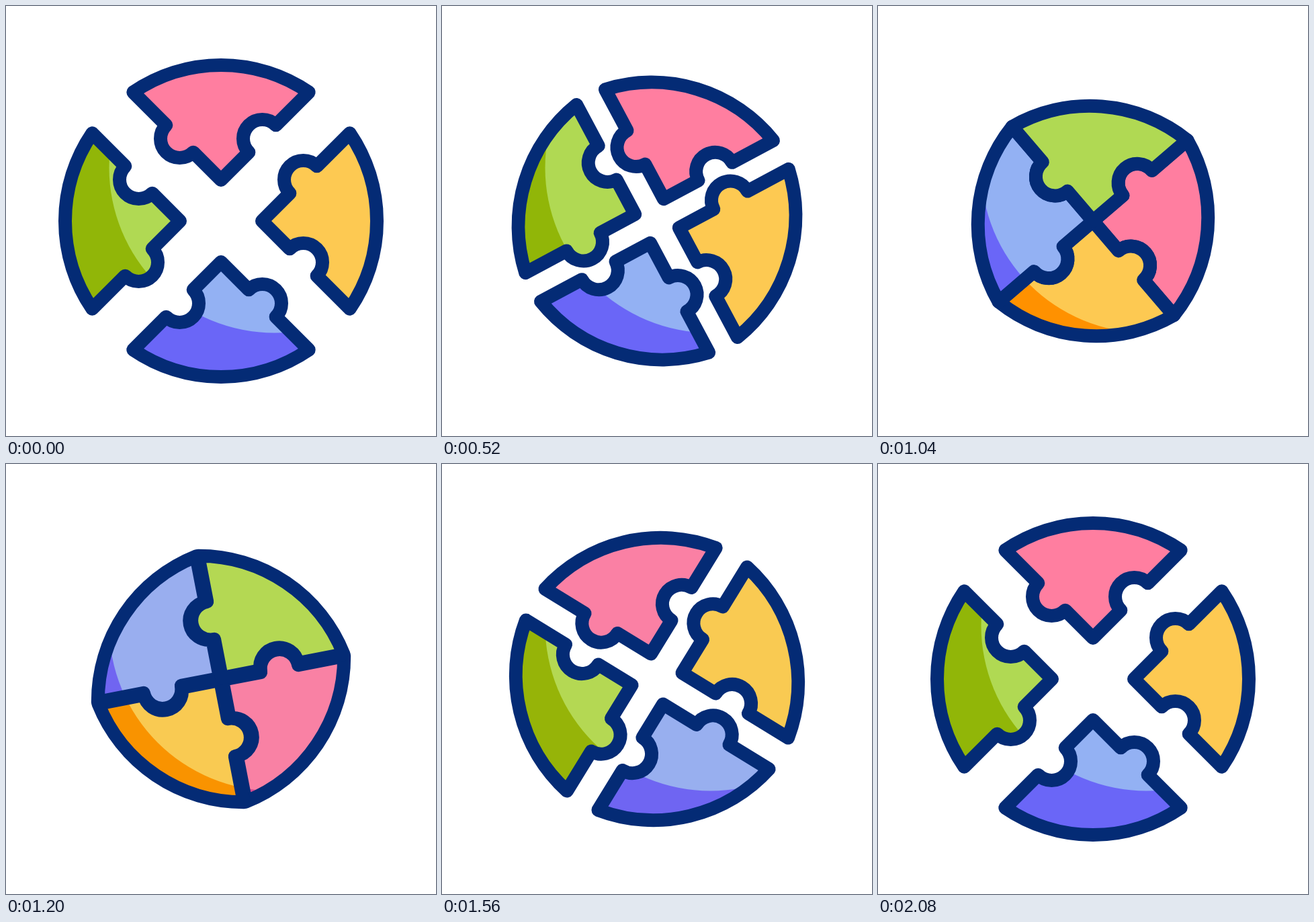
Recreate the animation shown at these times as an HTML page with a canvas. Size 640x640 px, loop 2200 ms.

```html
<!DOCTYPE html>
<html lang="en">
<head>
<meta charset="utf-8">
<title>Puzzle wheel</title>
<style>
html, body { margin: 0; width: 100%; height: 100%; overflow: hidden; background: #fff; }
canvas { display: block; width: 640px; height: 640px; }
</style>
</head>
<body>
<canvas id="stage" width="640" height="640"></canvas>
<script>
const ctx = document.getElementById('stage').getContext('2d');
const LOOP = 2200, SPREAD = 61, INK = '#042b75';

// Clockwise from the top: lit colour, shaded colour
const COLORS = [
  { lit: [255, 126, 160], shade: [219, 75, 139] },
  { lit: [253, 201, 82], shade: [255, 145, 0] },
  { lit: [147, 177, 243], shade: [106, 102, 247] },
  { lit: [176, 217, 83], shade: [145, 182, 8] }
];

// Upward quarter with its tip at the origin: tab on the left edge, socket on the right
const piece = (() => {
  const corner = 130.7, knob = 61.5, r = 28.5, q = Math.PI / 4;
  const half = Math.atan2(corner, corner + SPREAD);
  const p = new Path2D();
  p.moveTo(0, 0);
  p.arc(-knob, -knob, r, q, 5 * q);
  p.arc(0, SPREAD, 232, -2 * q - half, -2 * q + half);
  p.arc(knob, -knob, r, -q, 3 * q, true);
  p.closePath();
  return p;
})();

const clamp = x => Math.min(1, Math.max(0, x));
const progress = (t, from, to) => clamp((t - from) / (to - from));

// cubic-bezier(a, 0, 1 - a, 1)
function ease(x, a) {
  let lo = 0, hi = 1;
  for (let i = 0; i < 24; i++) {
    const s = (lo + hi) / 2, u = 1 - s;
    if (3 * a * s * u * u + 3 * (1 - a) * s * s * u + s ** 3 < x) lo = s;
    else hi = s;
  }
  return lo * lo * (3 - 2 * lo);
}

const mix = (a, b, k) => `rgb(${a.map((v, i) => Math.round(v + (b[i] - v) * k))})`;

function drawPiece(i, turn, gap, fade) {
  const from = COLORS[i], to = COLORS[(i + 2) % 4];
  ctx.save();
  ctx.translate(320, 320);
  ctx.rotate(turn + i * Math.PI / 2);
  ctx.translate(0, -gap);
  ctx.fillStyle = mix(from.shade, to.shade, fade);
  ctx.fill(piece);

  // The light stays still while the pieces turn beneath it
  ctx.save();
  ctx.clip(piece);
  ctx.resetTransform();
  ctx.beginPath();
  ctx.arc(399.5, 240.5, 246, 0, 2 * Math.PI);
  ctx.fillStyle = mix(from.lit, to.lit, fade);
  ctx.fill();
  ctx.restore();

  ctx.stroke(piece);
  ctx.restore();
}

function draw(now) {
  const t = now % LOOP;
  const turn = Math.PI * ease(progress(t, 40, 1997), 0.531);
  const closing = ease(progress(t, 22, 1063), 0.667);
  const opening = ease(progress(t, 1011, 2019), 0.667);
  const fade = progress(t, 1180, 1580);
  ctx.fillStyle = '#fff';
  ctx.fillRect(0, 0, 640, 640);
  ctx.strokeStyle = INK;
  ctx.lineWidth = 20;
  ctx.lineJoin = 'round';
  for (let i = 0; i < 4; i++) drawPiece(i, turn, SPREAD * (1 - closing + opening), fade);
}

const start = performance.now();
function tick() {
  draw(performance.now() - start);
  requestAnimationFrame(tick);
}
tick();
</script>
</body>
</html>
```
